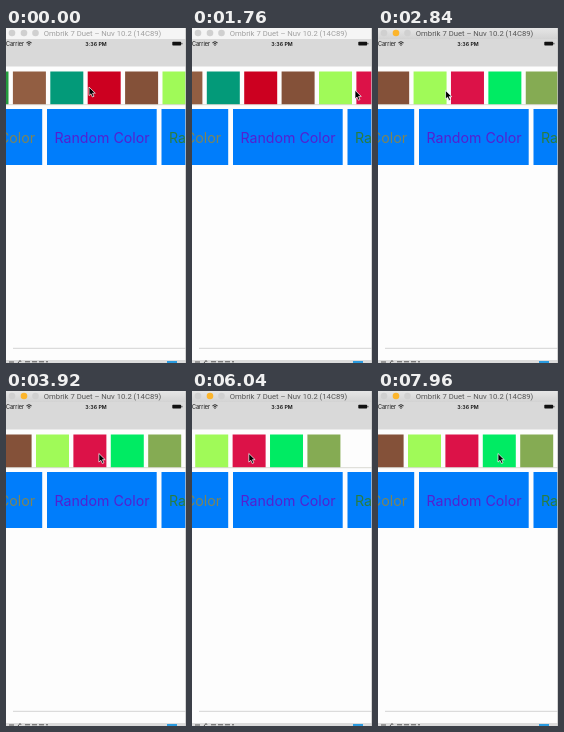
An HTML page that plays this animation: 180x335 px, repeating every 8 s.

```html
<!DOCTYPE html>
<html lang="en">
<head>
<meta charset="utf-8">
<title>Swatch scroller</title>
<style>
  html, body { margin: 0; width: 100%; height: 100%; overflow: hidden; background: #fff; }
  svg { display: block; width: 100vw; height: 100vh; }
  text { font-family: Inter, Roboto, sans-serif; }
  #title { font-family: Roboto, sans-serif; }
</style>
</head>
<body>
<svg viewBox="0 0 180 335">
  <defs>
    <linearGradient id="chrome" x2="0" y2="1">
      <stop stop-color="#e6e6e6"/><stop offset="1" stop-color="#d3d3d3"/>
    </linearGradient>
  </defs>
  <rect width="180" height="335" fill="#fdfdfd"/>

  <rect id="bar" width="180" height="11"/>
  <g id="lights">
    <circle cx="6" cy="5" r="3.3"/><circle cx="18" cy="5" r="3.3"/><circle cx="29.5" cy="5" r="3.3"/>
  </g>
  <text id="title" x="96.5" y="7.9" font-size="7.7" text-anchor="middle">Ombrik 7 Duet – Nuv 10.2 (14C89)</text>

  <rect y="11" width="180" height="27.5" fill="#d9d9d9"/>
  <text y="17.6" font-size="5.5" fill="#111">Carrier</text>
  <path d="M20.4 14.8q2.6-2.2 5.2 0M21.5 16.1q1.5-1.2 3 0" fill="none" stroke="#111" stroke-width=".9"/>
  <circle cx="23" cy="17.2" r=".6" fill="#111"/>
  <text x="90" y="17.6" font-size="5.3" font-weight="600" text-anchor="middle" fill="#111">3:36 PM</text>
  <rect x="166.3" y="13.7" width="8.8" height="3.8" rx=".7" fill="#111"/>
  <rect x="175.5" y="14.9" width=".8" height="1.4" fill="#111"/>

  <g id="swatches"></g>
  <path d="M0 76.7H180" stroke="#d0d0c8" stroke-width=".8"/>
  <g id="cards"></g>

  <path d="M7 320.3H180" stroke="#cfcfcf" stroke-width=".9"/>
  <rect y="332" width="180" height="3" fill="#dcdcdc"/>
  <path d="M3 334H8M12 335l2-2.5 2 2.5M19 333.8H42" fill="none" stroke="#555" stroke-dasharray="5 2"/>
  <rect x="161" y="333" width="10" height="2" fill="#2a9be0"/>
  <path d="M179.6 0V335" stroke="#c4c4c4" stroke-width=".8"/>

  <path id="cursor" d="M0 0V8.6L2 6.8 3.4 10 5 9.3 3.6 6.2H6.3Z" fill="#000" stroke="#fff" stroke-width=".7"/>
</svg>
<script>
const $ = id => document.getElementById(id);
const LOOP = 8000, WIDTH = 180, PITCH = 37.4;
const START = 156.5, REST = 30;   // left edge of the lime swatch
const SLOP = 4;                   // pointer travel before a drag takes hold

function add(parent, tag, attrs, text = '') {
  const el = document.createElementNS('http://www.w3.org/2000/svg', tag);
  for (const k in attrs) el.setAttribute(k, attrs[k]);
  el.textContent = text;
  return parent.appendChild(el);
}

// Swatches are placed relative to the lime one.
['#239c3d', '#925e42', '#039a79', '#cc0020', '#845139', '#a0fa58', '#dc1248', '#00eb63', '#85ab53']
  .forEach((fill, i) => add($('swatches'), 'rect', { x: (i - 5) * PITCH, y: 43.5, width: 33, height: 33, fill }));

['#7d8558', '#5420d0', '#297d42'].forEach((fill, i) => {
  const x = 41 + (i - 1) * 114.5;
  add($('cards'), 'rect', { x, y: 81, width: 109.7, height: 56, fill: '#007dfb' });
  add($('cards'), 'text', { x: x + 55, y: 114.7, 'font-size': 14.2, 'text-anchor': 'middle', fill }, 'Random Color');
});

// Pointer gestures; a drag pulls the row along.
const moves = [
  { from: 100, to: 600, x: 49.5, drag: true },
  { from: 800, to: 1700, x: 163 },
  { from: 1790, to: 3190, x: 50, drag: true },
  { from: 3500, to: 4350, x: 137 },
  { from: 4550, to: 5320, x: 95, drag: true },
  { from: 5350, to: 5570, x: 118 },
  { from: 5600, to: 6105, x: 54, drag: true },
  { from: 6200, to: 7000, x: 110 },
  { from: 7100, to: 7700, x: 120 }
];
const drags = moves.filter(m => m.drag);
const ACTIVE_AT = drags[1].from;

function ease(u) {
  u = Math.min(1, Math.max(0, u));
  return u * u * (3 - 2 * u);
}

const pointerX = t => moves.reduce((x, m) => x + (m.x - x) * ease((t - m.from) / (m.to - m.from)), 83);
const pointerY = t => 62.5 - 3.5 * Math.exp(-t / 700);

// Resistance past the end of the row, and the spring back from it.
function band(x) {
  const over = REST - x;
  return over <= 0 ? x : REST - WIDTH * (1 - 1 / (1 + over * 0.55 / WIDTH));
}
const spring = ms => (1 + ms / 85) * Math.exp(-ms / 85);

function scroll(t) {
  let x = START;
  for (const { from, to } of drags) {
    if (t < from) break;
    const travel = pointerX(from) - pointerX(Math.min(t, to));
    x = band(x - Math.max(0, travel - SLOP));
    if (t > to && x < REST) x = REST + (x - REST) * spring(t - to);
  }
  return x;
}

function draw(t) {
  const active = t >= ACTIVE_AT;
  $('bar').setAttribute('fill', active ? 'url(#chrome)' : '#f5f5f5');
  $('title').setAttribute('fill', active ? '#555' : '#a0a0a0');
  [...$('lights').children].forEach((c, i) =>
    c.setAttribute('fill', active && i === 1 ? '#fcb52c' : '#d0d0d0'));
  $('swatches').setAttribute('transform', `translate(${scroll(t)} 0)`);
  $('cursor').setAttribute('transform', `translate(${pointerX(t)} ${pointerY(t)})`);
}

const start = performance.now();
function tick(now) {
  draw(Math.max(0, now - start) % LOOP);
  requestAnimationFrame(tick);
}
draw(0);
requestAnimationFrame(tick);
</script>
</body>
</html>
```
